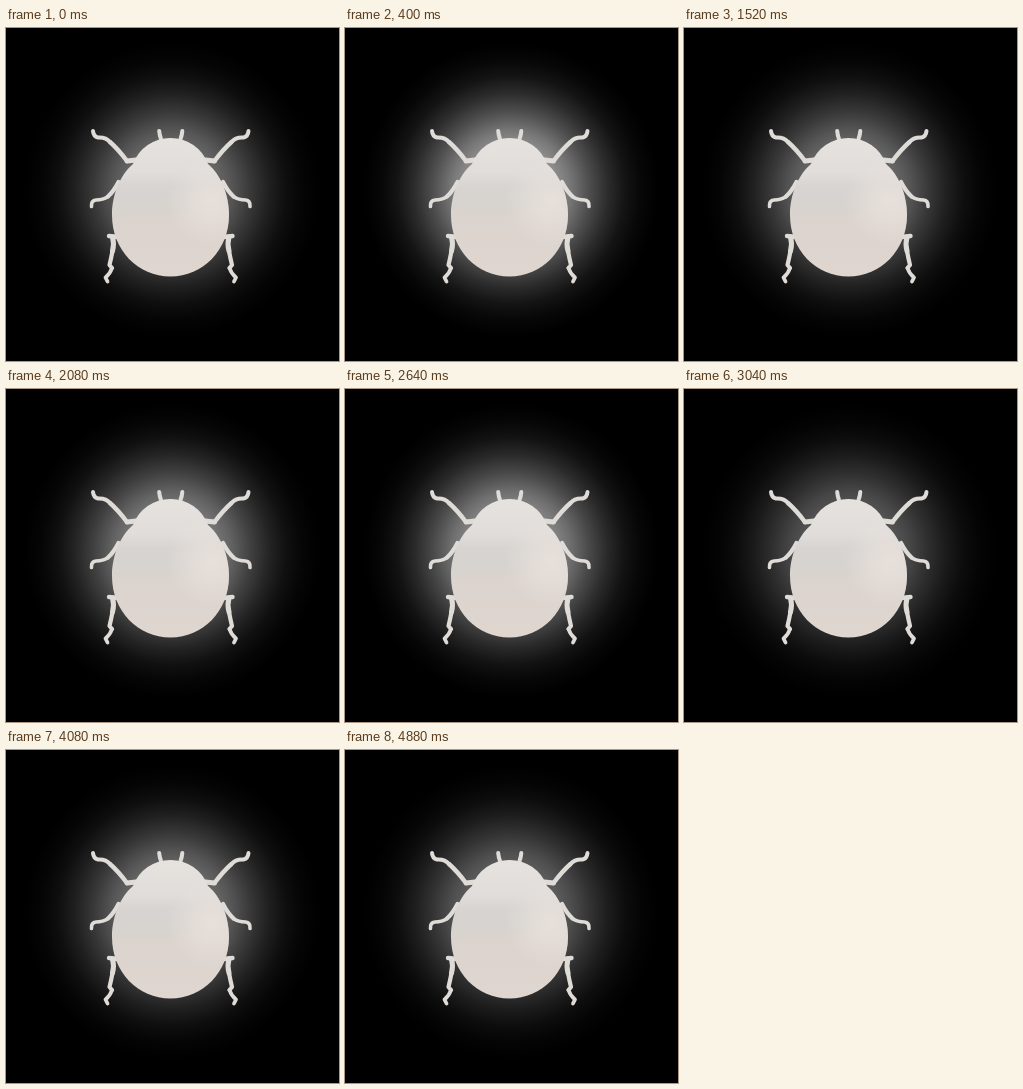
These frames come from a looping animation (333x333 px, 4.96 s). An HTML page:

```html
<!DOCTYPE html>
<html lang="en">
<head>
<meta charset="utf-8">
<title>Glowing beetle</title>
<style>
  html, body { margin: 0; width: 100%; height: 100%; overflow: hidden; background: #000; }
  svg { display: block; width: 100vw; height: 100vh; }
  .limbs { fill: none; stroke: #dfdbd7; stroke-linecap: round; stroke-linejoin: round; }
</style>
</head>
<body>
<svg viewBox="0 0 333 333">
  <defs>
    <radialGradient id="halo" gradientUnits="userSpaceOnUse" cx="166" cy="162" r="148">
      <stop offset="0" stop-color="#fff" stop-opacity=".88"/>
      <stop offset=".27" stop-color="#fff" stop-opacity=".76"/>
      <stop offset=".405" stop-color="#fff" stop-opacity=".59"/>
      <stop offset=".53" stop-color="#fff" stop-opacity=".39"/>
      <stop offset=".655" stop-color="#fff" stop-opacity=".22"/>
      <stop offset=".77" stop-color="#fff" stop-opacity=".1"/>
      <stop offset=".88" stop-color="#fff" stop-opacity=".035"/>
      <stop offset="1" stop-color="#fff" stop-opacity="0"/>
    </radialGradient>
    <linearGradient id="shell" x1="0" y1="0" x2="0" y2="1">
      <stop offset="0" stop-color="#e6e3df"/>
      <stop offset=".25" stop-color="#e0ddda"/>
      <stop offset=".35" stop-color="#d7d4d1"/>
      <stop offset=".5" stop-color="#d7d3cf"/>
      <stop offset=".58" stop-color="#dbd3cd"/>
      <stop offset="1" stop-color="#dfd6d0"/>
    </linearGradient>
    <radialGradient id="sheen" gradientUnits="userSpaceOnUse" cx="206" cy="172" r="46">
      <stop offset="0" stop-color="#eae2dd" stop-opacity=".8"/>
      <stop offset=".4" stop-color="#eae2dd" stop-opacity=".6"/>
      <stop offset="1" stop-color="#eae2dd" stop-opacity="0"/>
    </radialGradient>
    <path id="body" d="M127 136A40 40 0 0 1 202 136C215 147 223 167 223 187C223 222 197 248.500 164.500 248.500C132 248.500 106 222 106 187C106 167 114 147 127 136Z"/>
    <g id="side" class="limbs">
      <path stroke-width="4" d="M155 111Q153.500 107 153.200 103"/>
      <path stroke-width="4" d="M87 103Q87.500 108.500 92 109.500Q100 109 104 114"/>
      <path stroke-width="4.400" d="M104 114Q112 121 121 133"/>
      <path stroke-width="5" d="M121 133L130 132"/>
      <path stroke-width="3.600" d="M85.500 178.500Q85 172.500 90 172Q97 172 102 168.500"/>
      <path stroke-width="4.200" d="M102 168.500Q108 163 112.500 154"/>
      <path stroke-width="4.400" d="M112 209L103 208"/>
      <path stroke-width="5" d="M106.500 209Q108.500 216 106.500 223"/>
      <path stroke-width="4.200" d="M106.500 223Q105 231 103.500 237L106 240"/>
      <path stroke-width="3.800" d="M106 240Q104 246 99.500 249.500L101.500 253.500"/>
    </g>
  </defs>
  <rect width="333" height="333"/>
  <circle id="glow" cx="166" cy="162" r="148" fill="url(#halo)"/>
  <use href="#side"/>
  <use href="#side" transform="matrix(-1 0 0 1 329.500 0)"/>
  <use href="#body" fill="url(#shell)"/>
  <use href="#body" fill="url(#sheen)"/>
</svg>
<script>
  const LOOP = 4960, TICK = 80;
  // [time in ms, glow strength]
  const pulse = [
    [0, .57], [800, 1], [1520, .57], [2640, .73],
    [3360, .28], [4080, .57], [4880, .52], [LOOP, .57]
  ];
  const glow = document.getElementById('glow');
  const ease = x => x * x * (3 - 2 * x);

  function strength(t) {
    const i = pulse.findIndex(([end]) => end > t);
    const [t0, a] = pulse[i - 1], [t1, b] = pulse[i];
    return a + (b - a) * ease((t - t0) / (t1 - t0));
  }

  const start = performance.now();
  function draw() {
    const t = (performance.now() - start) % LOOP;
    glow.setAttribute('opacity', strength(Math.floor(t / TICK) * TICK));
    requestAnimationFrame(draw);
  }
  draw();
</script>
</body>
</html>
```
